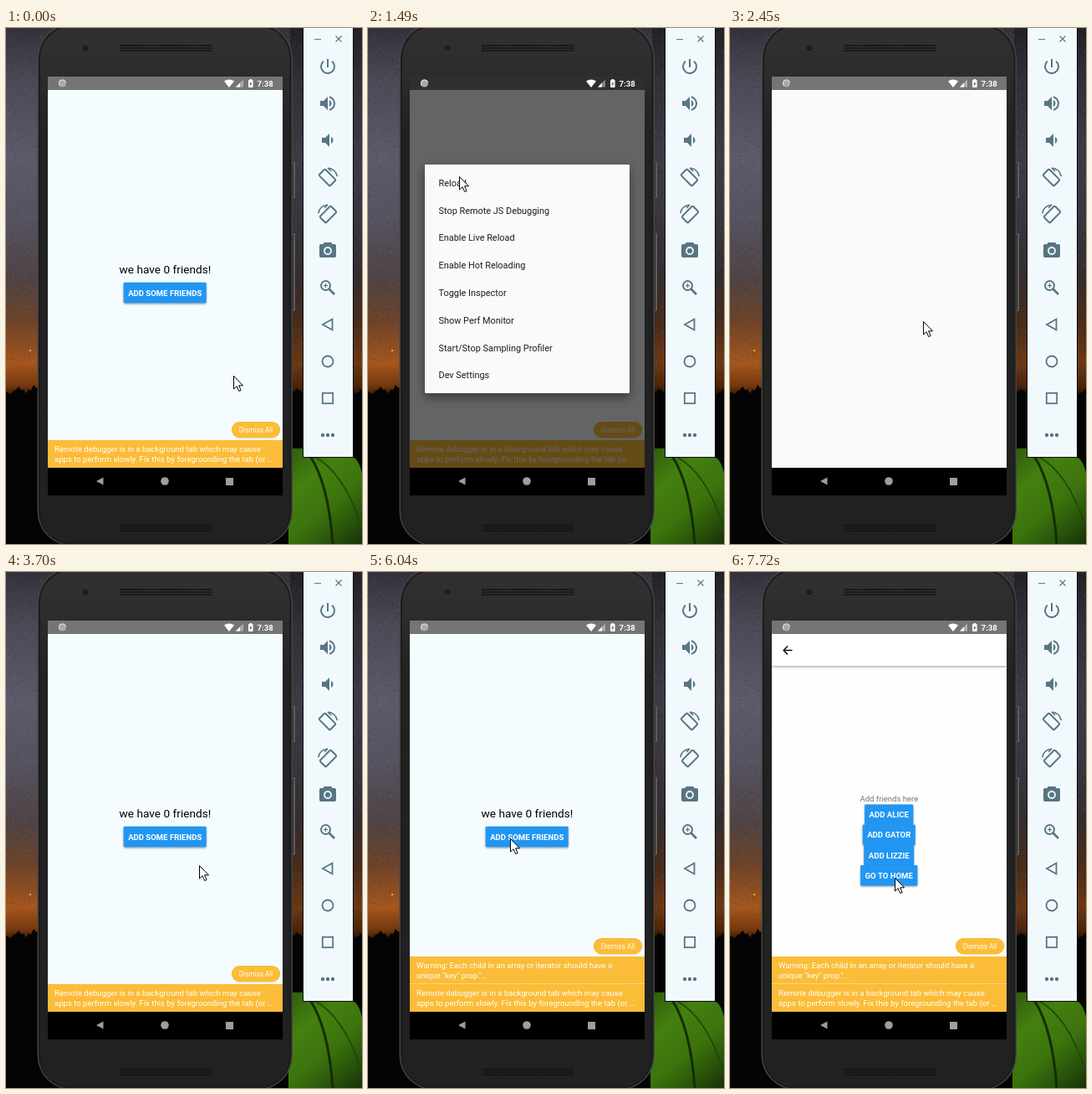
An HTML page with a canvas for the animation above (8 s loop, 426 px wide and 616 px high).

```html
<!DOCTYPE html>
<html lang="en">
<head>
<meta charset="utf-8">
<title>Phone emulator</title>
<style>
html, body { margin: 0; width: 100%; height: 100%; overflow: hidden; background: #000; }
canvas { display: block; width: 426px; height: 616px; }
</style>
</head>
<body>
<canvas id="stage" width="426" height="616"></canvas>
<script>
const W = 426, H = 616, LOOP = 8000;
const DP = 281 / 411.4; // screen pixels per dp
const BLUE = '#2196f3', ICON = '#587583', AMBER = '#fbbc38', PANEL = '#f2f9fd';
const stage = document.getElementById('stage').getContext('2d');
let g = stage;

function rect(x, y, w, h, fill, r = 0) {
  g.fillStyle = fill;
  g.beginPath();
  g.roundRect(x, y, w, h, r);
  g.fill();
}

function trace(points) {
  g.beginPath();
  points.forEach(([x, y], i) => i ? g.lineTo(x, y) : g.moveTo(x, y));
}

function paint(fill, stroke, width) {
  if (fill) { g.fillStyle = fill; g.fill(); }
  if (stroke) { g.strokeStyle = stroke; g.lineWidth = width; g.stroke(); }
}

function poly(points, fill, stroke, width = 1) {
  trace(points);
  g.closePath();
  paint(fill, stroke, width);
}

function line(points, color, width) {
  trace(points);
  paint(null, color, width);
}

function disc(x, y, r, fill, stroke, width) {
  g.beginPath();
  g.arc(x, y, r, 0, 7);
  paint(fill, stroke, width);
}

function arc(x, y, r, from, to, color, width) {
  g.beginPath();
  g.arc(x, y, r, from * Math.PI, to * Math.PI);
  paint(null, color, width);
}

function curve(x0, y0, cx, cy, x1, y1, color, width) {
  g.beginPath();
  g.moveTo(x0, y0);
  g.quadraticCurveTo(cx, cy, x1, y1);
  paint(null, color, width);
}

function text(str, x, y, dp, color, weight = 400, align = 'left') {
  g.font = `${weight} ${dp * DP}px Roboto, sans-serif`;
  g.textAlign = align;
  g.fillStyle = color;
  g.fillText(str, x, y);
}

function shadow(color, blur, dy) {
  g.shadowColor = color;
  g.shadowBlur = blur;
  g.shadowOffsetY = dy;
}

function at(x, y, draw) {
  g.save();
  g.translate(x, y);
  draw();
  g.restore();
}

function gradient(x0, y0, x1, y1, stops) {
  const grad = g.createLinearGradient(x0, y0, x1, y1);
  stops.forEach(([p, c]) => grad.addColorStop(p, c));
  return grad;
}

function random(seed) {
  return () => (seed = seed * 16807 % 2147483647) / 2147483647;
}

// ---- static surroundings ----

function wallpaper() {
  rect(0, 0, W, H, gradient(0, 0, 0, 440, [
    [0, '#33323b'], [.15, '#4b4a57'], [.35, '#5c5a6a'], [.52, '#565260'], [.68, '#4f4344'],
    [.8, '#6f4329'], [.91, '#a5561d'], [.97, '#75380f'], [1, '#2a1408']]));
  rect(340, 0, 86, 450, 'rgba(0,0,0,.35)');
  const rnd = random(77);
  for (let i = 0; i < 9000; i++) {
    const x = rnd() * W, y = rnd() * 410;
    rect(x | 0, y | 0, 1, 1, rnd() < .5 ? 'rgba(0,0,0,.22)' : 'rgba(190,190,210,.14)');
  }
  rect(28, 384, 2, 2, '#ffab45');
  g.fillStyle = '#050404';
  g.beginPath();
  g.moveTo(0, H);
  for (let x = 0; x <= W; x += 3) g.lineTo(x, 434 + 3 * Math.sin(x * .32) + 2 * Math.sin(x * 1.1) - (x < 40 ? x * .1 : 0));
  g.lineTo(W, H);
  g.fill();
  tent();
}

function tent() {
  g.beginPath();
  g.moveTo(338, 502);
  g.quadraticCurveTo(390, 500, 418, 514);
  g.quadraticCurveTo(426, 522, 428, 545);
  g.lineTo(428, H);
  g.lineTo(338, H);
  paint(gradient(338, 505, 426, 610, [[0, '#2f5f0c'], [.3, '#44800f'], [.6, '#3c730d'], [.85, '#28500a'], [1, '#1a3606']]));
  curve(364, 511, 386, 545, 391, H, '#142d05', 3);
  curve(368, 511, 404, 530, 424, 592, '#1f4507', 1.5);
}

function grille(y) {
  for (let i = 0; i < 37; i++)
    for (let j = 0; j < 3; j++) rect(136 + i * 3 + j % 2, y + j * 3, 2, 2, '#121212');
}

function phoneBody() {
  rect(342, 160, 4, 43, '#5d5d5d', 1);
  rect(342, 245, 4, 93, '#5d5d5d', 1);
  rect(343, 161, 1, 41, '#2a2a2a');
  rect(343, 246, 1, 91, '#2a2a2a');
  rect(37.5, -5, 305.5, 623, '#454545', 41);
  rect(39, -4, 302.5, 621, '#1b1b1b', 40);
  rect(41, -2, 298.5, 617, gradient(0, 0, 0, H, [[0, '#313131'], [.09, '#2c2c2c'], [.2, '#222'], [1, '#212121']]), 38);
  disc(95, 24, 3, '#161616');
  disc(95, 24, 1.2, '#303036');
  grille(20);
  grille(593);
}

function speaker(x) {
  poly([[x, -3], [x + 4, -3], [x + 9, -8], [x + 9, 8], [x + 4, 3], [x, 3]], ICON);
  g.beginPath();
  g.arc(x + 9, 0, 4.5, -1.1, 1.1);
  paint(ICON);
}

function rotateIcon(flip) {
  g.scale(flip, 1);
  arc(0, .5, 11.3, -.5, -.04, ICON, 1.6);
  line([[0, -11], [4, -7]], ICON, 1.6);
  g.translate(-.5, .5);
  g.rotate(Math.PI / 4);
  g.beginPath();
  g.roundRect(-9.3, -5.2, 18.6, 10.4, 1.5);
  paint(PANEL, ICON, 2);
}

const toolIcons = [
  () => {
    arc(0, 0, 8, -.28, 1.28, ICON, 2);
    rect(-1, -9, 2, 10, ICON);
  },
  () => {
    speaker(-9);
    arc(0, 0, 8, -.42, .42, ICON, 2);
  },
  () => speaker(-7),
  () => rotateIcon(1),
  () => rotateIcon(-1),
  () => {
    rect(-10, -8, 20, 16, ICON, 2);
    rect(-5, -10, 10, 4, ICON, 1);
    disc(0, 0, 4, ICON, PANEL, 1.8);
  },
  () => {
    disc(-2.5, -2.5, 5.5, null, ICON, 2);
    line([[1.5, 1.5], [8, 8]], ICON, 2.6);
    line([[-5, -2.5], [0, -2.5]], ICON, 1.2);
    line([[-2.5, -5], [-2.5, 0]], ICON, 1.2);
  },
  () => poly([[-6, 0], [5.5, -6.5], [5.5, 6.5]], null, ICON, 1.8),
  () => disc(0, 0, 6.5, null, ICON, 1.8),
  () => {
    g.strokeStyle = ICON;
    g.lineWidth = 1.8;
    g.strokeRect(-6.2, -6.2, 12.4, 12.4);
  },
  () => [-6, 0, 6].forEach(x => disc(x, 0, 2.2, ICON))
];

function toolbar() {
  rect(355, 0, 61, 513, '#0c0c0c');
  rect(356, 0, 59, 512, PANEL);
  rect(369, 13, 8, 1, '#6b7880');
  line([[394.5, 9.5], [401.5, 16.5]], '#6b7880', 1.2);
  line([[401.5, 9.5], [394.5, 16.5]], '#6b7880', 1.2);
  toolIcons.forEach((draw, i) => at(385, 46 + i * 44, draw));
}

function navBar() {
  rect(50, 525, 281, 33, '#000');
  poly([[108, 541], [116.5, 536.5], [116.5, 545.5]], '#9e9e9e');
  disc(190, 541, 4.8, '#9e9e9e');
  rect(263, 537, 9, 9, '#9e9e9e');
}

// ---- screen contents ----

function statusBar(dim) {
  rect(50, 58, 281, 16, '#757575');
  if (dim) rect(50, 58, 281, 16, `rgba(0,0,0,${dim})`);
  disc(67.5, 66, 4.6, '#a9a9a9');
  arc(67.5, 66, 4, .75, 1.9, '#dedede', 1.2);
  g.beginPath();
  g.moveTo(267, 71);
  g.lineTo(261, 63.5);
  g.quadraticCurveTo(267, 59.5, 273, 63.5);
  paint('#fff');
  poly([[275, 70.5], [284, 70.5], [284, 61.5]], 'rgba(255,255,255,.4)');
  poly([[275, 70.5], [280, 70.5], [280, 65.5]], '#fff');
  rect(290, 62, 5.6, 9, '#fff', .8);
  rect(291.5, 61, 2.6, 2, '#fff');
  poly([[293.4, 63.5], [291.2, 67.2], [292.5, 67.2], [292.2, 69.8], [294.4, 66], [293.1, 66]], '#666');
  text('7:38', 300.5, 70, 14, '#fff', 700);
}

function button(label, y) {
  g.font = `700 ${14 * DP}px Roboto, sans-serif`;
  const w = g.measureText(label).width + 16 * DP;
  g.save();
  shadow('rgba(0,0,0,.4)', 2.5, 1.2);
  rect(190.2 - w / 2, y, w, 24.4, BLUE, 1.4);
  g.restore();
  text(label, 190.2, Math.round(y + 15.8), 14, '#fff', 700, 'center');
}

function home() {
  rect(50, 74, 281, 451, '#f5fcff');
  text('we have 0 friends!', 190.4, 293, 20, '#000', 400, 'center');
  button('ADD SOME FRIENDS', 303.8);
}

function friendsPage(alpha, dy) {
  g.save();
  g.globalAlpha = alpha;
  g.translate(0, dy);
  rect(50, 74, 281, 451, '#fefefe');
  text('Add friends here', 190.4, 274, 14, '#757575', 400, 'center');
  ['ADD ALICE', 'ADD GATOR', 'ADD LIZZIE', 'GO TO HOME'].forEach((s, i) => button(s, 277.4 + i * 24.2));
  g.translate(0, -dy);
  shadow('rgba(0,0,0,.4)', 3, 1);
  rect(50, 74, 281, 38, '#fff');
  shadow('transparent', 0, 0);
  line([[74.5, 93.5], [64.5, 93.5]], '#000', 1.4);
  line([[69, 88.6], [64.2, 93.5], [69, 98.4]], '#000', 1.4);
  g.restore();
}

const warnings = [
  ['Remote debugger is in a background tab which may cause', 'apps to perform slowly. Fix this by foregrounding the tab (or …'],
  ['Warning: Each child in an array or iterator should have a', 'unique "key" prop."…']
];

function yellowBox(count) {
  if (!count) return;
  const top = 525 - count * 33;
  warnings.slice(0, count).forEach(([a, b], i) => {
    const y = 492 - i * 33;
    rect(50, y, 281, 33, AMBER);
    if (i) rect(50, y + 32, 281, 1, '#fcd583');
    text(a, 58, y + 14, 14, '#fff');
    text(b, 58, y + 26, 14, '#fff');
  });
  rect(269.8, top - 22, 58.4, 19.4, AMBER, 9.7);
  text('Dismiss All', 299, top - 9, 12, '#fff', 400, 'center');
}

const menuItems = ['Reload', 'Stop Remote JS Debugging', 'Enable Live Reload', 'Enable Hot Reloading',
  'Toggle Inspector', 'Show Perf Monitor', 'Start/Stop Sampling Profiler', 'Dev Settings'];

function devMenu(alpha) {
  g.save();
  g.globalAlpha = alpha;
  shadow('rgba(0,0,0,.45)', 12, 5);
  rect(68, 163, 245, 273, '#fafafa', 1.4);
  shadow('transparent', 0, 0);
  menuItems.forEach((s, i) => text(s, 84.5, Math.round(188.8 + i * 32.8), 16, '#1c1c1c'));
  g.restore();
}

function pointer([x, y]) {
  at(x + .5, y + .5, () => poly([[0, 0], [0, 15.5], [3.6, 12.2], [6.2, 18], [8.6, 17], [6.1, 11.3], [11, 11.3]], '#fff', '#000', 1));
}

// ---- timeline: each value holds until the next time ----

const pointerSteps = [
  [0, 272, 415], [800, 263, 383], [950, 215, 310], [1070, 166, 240], [1220, 125, 195], [1340, 110, 177],
  [1490, 109, 177], [2180, 130, 174], [2300, 231, 279], [2450, 231, 350], [4540, 205, 345], [4660, 174, 334],
  [4810, 171, 319], [4960, 175, 311], [5240, 172, 314], [5360, 170, 317], [5510, 170, 318], [7020, 200, 263],
  [7140, 209, 266], [7290, 201, 301], [7440, 210, 335], [7570, 205, 360], [7720, 197, 365]];
const dimSteps = [[0, 0], [800, .3], [950, .5], [1070, .6], [1880, .288], [2030, 0]];
const menuSteps = [[0, 0], [800, .96], [950, 1], [1880, 0]];
const warningSteps = [[0, 1], [1880, 0], [3700, 1], [6040, 2]];
const pageSteps = [[0, 0, 0], [6190, .8, 3], [6310, 1, 0]];

const held = (steps, t) => steps.findLast(s => s[0] <= t).slice(1);

const backdrop = document.createElement('canvas');
backdrop.width = W;
backdrop.height = H;
g = backdrop.getContext('2d');
wallpaper();
phoneBody();
toolbar();
navBar();
g = stage;

function render(t) {
  const [dim] = held(dimSteps, t), [menu] = held(menuSteps, t), [alpha, dy] = held(pageSteps, t);
  g.drawImage(backdrop, 0, 0);
  g.save();
  g.beginPath();
  g.rect(50, 58, 281, 467);
  g.clip();
  if (t >= 1880 && t < 3700) rect(50, 74, 281, 451, '#fafafa');
  else home();
  if (alpha) friendsPage(alpha, dy);
  yellowBox(held(warningSteps, t)[0]);
  if (dim) rect(50, 74, 281, 451, `rgba(0,0,0,${dim})`);
  statusBar(dim);
  if (menu) devMenu(menu);
  g.restore();
  pointer(held(pointerSteps, t));
}

const start = performance.now();
function frame() {
  render((performance.now() - start) % LOOP);
  requestAnimationFrame(frame);
}
frame();
</script>
</body>
</html>
```
